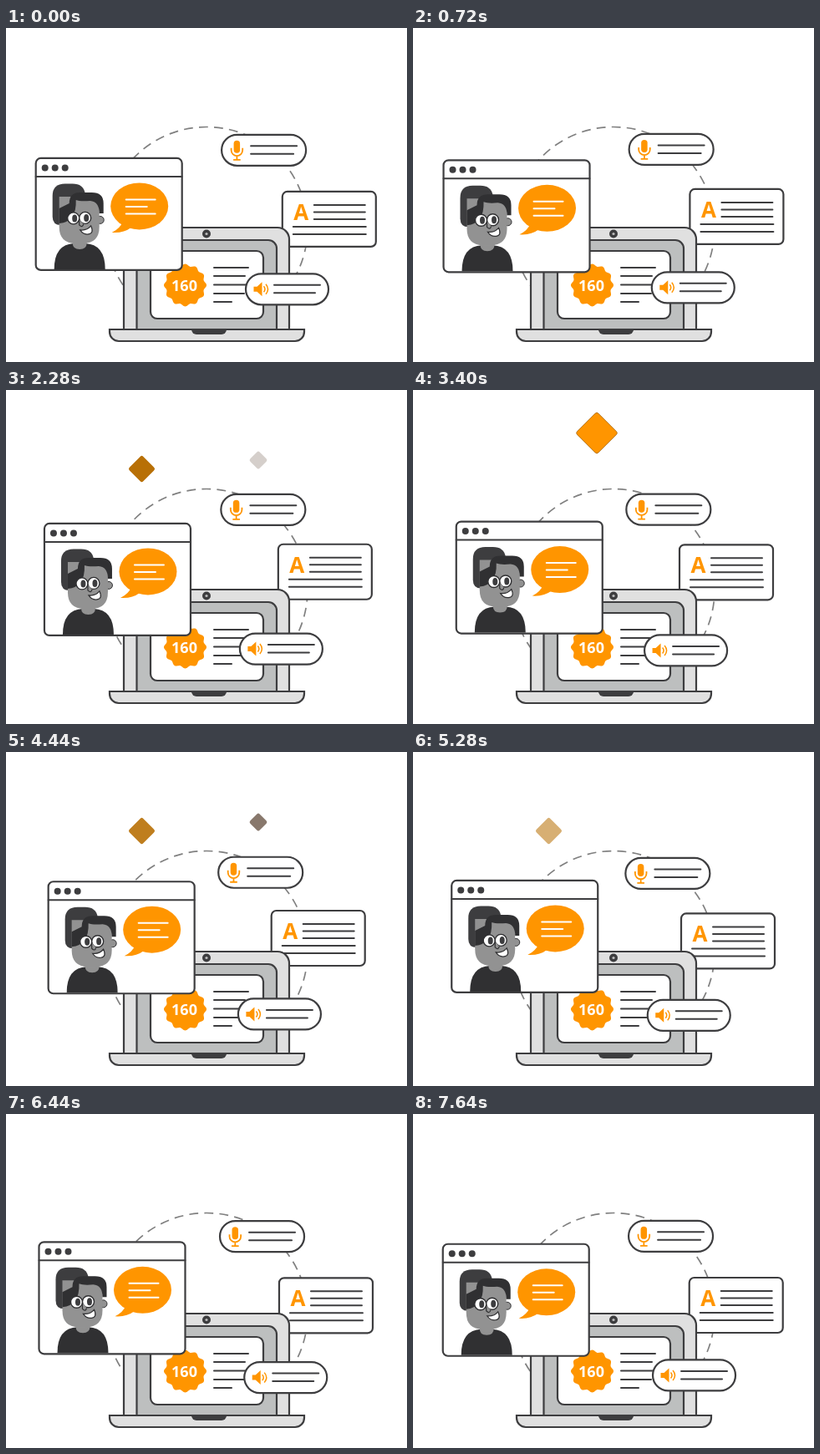
Write an HTML page that moves like this. It is 480 px wide and 400 px high and loops after 7680 ms.

```html
<!DOCTYPE html>
<html lang="en">
<head>
<meta charset="utf-8">
<title>Online lesson</title>
<style>
  html, body { margin: 0; width: 100%; height: 100%; overflow: hidden; background: #fff; }
  svg { display: block; width: 480px; height: 400px; }
  text { font-family: "Open Sans", "Noto Sans", sans-serif; font-weight: 700; }
  .o { stroke: #3d3d3f; stroke-width: 2.2; }
  .l { stroke: #3d3d3f; stroke-width: 2; stroke-linecap: round; fill: none; }
  .w { fill: #fff; }
  .a { fill: #ff9500; }
  .d { fill: #3d3d3f; }
  .s { fill: #929292; }
</style>
</head>
<body>
<svg viewBox="0 0 480 400">
  <circle id="ring" cx="240" cy="239.5" r="121" fill="none" stroke="#808080" stroke-width="1.7"
          pathLength="420" stroke-dasharray="6 4"/>

  <rect id="left" class="gem" fill="#b87006"/>
  <rect id="right" class="gem" fill="#88786c"/>
  <rect id="top" class="gem a" stroke="#a86508" stroke-width=".8"/>

  <g id="mic">
    <rect class="w o" width="101" height="37" rx="18.5"/>
    <rect class="a" x="14.5" y="7" width="7.5" height="15" rx="3.7"/>
    <path d="M11.5 16v2.5a6.8 6.8 0 0 0 13.6 0V16M18.3 25.5V30M14 30h8.6" fill="none" stroke="#ff9500" stroke-width="1.8"/>
    <path class="l" d="M35 13.5h55M35 23h51"/>
  </g>

  <g id="card">
    <rect class="w o" width="112" height="66" rx="6"/>
    <text class="a" x="13.5" y="34" font-size="26">A</text>
    <path class="l" d="M38 16h61M38 24.5h61M38 33h61M13 42h87M13 51h87"/>
  </g>

  <g id="laptop">
    <path class="o" fill="#e0e0e0" d="M141 361V253a14 14 0 0 1 14-14H325a14 14 0 0 1 14 14V361z"/>
    <path class="o" fill="#bdbfbf" d="M156.5 361V264a10 10 0 0 1 10-10H314a10 10 0 0 1 10 10V361z"/>
    <rect class="w o" x="173" y="267" width="135" height="81" rx="8"/>
    <path class="o" fill="#e0e0e0" d="M124 361H357V364a11 11 0 0 1-11 11H135a11 11 0 0 1-11-11z"/>
    <path class="d" d="M222 361H264a6 6 0 0 1-6 6H228a6 6 0 0 1-6-6z"/>
    <circle class="d" cx="240" cy="246.5" r="5"/>
    <circle fill="#bbb" cx="240" cy="246.5" r="1.6"/>
    <path id="badge" class="a"/>
    <text class="w" x="213.5" y="314.5" font-size="18" text-anchor="middle">160</text>
    <path class="l" d="M249 287h41M249 297h37M249 307.5h41M249 318h36M249 328h21"/>
  </g>

  <g id="sound">
    <rect class="w o" width="99" height="37" rx="18.5"/>
    <path class="a" d="M9.5 15.5h4l6-5.5v17l-6-5.5h-4z"/>
    <path d="M21.5 15q3 3.5 0 7M24 12.5q5 6 0 12" fill="none" stroke="#ff9500" stroke-width="1.5"/>
    <path class="l" d="M34 13.5h55M34 23h49"/>
  </g>

  <g id="window">
    <rect class="w o" width="175" height="134" rx="6"/>
    <path class="l" d="M0 22H175"/>
    <g class="d"><circle cx="11" cy="11.5" r="4"/><circle cx="23" cy="11.5" r="4"/><circle cx="35" cy="11.5" r="4"/></g>
    <path class="d" d="M20 45Q20 30.5 35 30.5H44Q57 30.5 59 42L62 80H30Q20 80 20 70z"/>
    <path fill="#303032" d="M22 133Q22 103 46 102H59Q83 103 83 133z"/>
    <path class="s" d="M44 94H61V101Q61 109 52.5 109T44 101z"/>
    <circle class="s" cx="77" cy="74" r="4.5" stroke="#303032"/>
    <path class="s" d="M28 46H76V82Q76 102 56 102H48Q28 102 28 82z"/>
    <path fill="#303032" d="M40 54Q40 41 53 41H67Q81 41 81 54V66H76Q76 52 65 51Q53 52 48 50Q49 76 28 78V60z"/>
    <g class="w" stroke="#303032" stroke-width="1.4"><circle cx="45" cy="72" r="7"/><circle cx="59" cy="71.5" r="7"/></g>
    <ellipse class="d" cx="46.5" cy="72" rx="3" ry="4.5"/>
    <ellipse class="d" cx="60.5" cy="71.5" rx="3" ry="4.5"/>
    <path class="s" d="M52 73v7q4 4 5-1" stroke="#303032" stroke-width="1.2"/>
    <path class="w" d="M53 86q8 1 13-5 4 9-3 10-6 1-10-5z" stroke="#303032" stroke-width="1.2"/>
    <path class="a" d="M104 76Q101 84 91 89Q105 90 114 83z"/>
    <ellipse class="a" cx="124" cy="57.5" rx="34.5" ry="28"/>
    <path d="M108 49.5h35M108 58h25M108 66.5h35" fill="none" stroke="#fff" stroke-width="2" stroke-linecap="round"/>
  </g>
</svg>
<script>
  const LOOP = 7680;
  const $ = id => document.getElementById(id);

  // Per axis: centre, then cos, sin, cos 2, sin 2 amplitudes
  const drift = {
    window: [[43.6, -8.2, 0, .3, -.4], [156.5, -.3, 3.4, -.3, .3]],
    mic: [[256.4, 1.7, 1.5, 0, 0], [126.4, 1.4, -1.2, 0, 0]],
    card: [[325, 6.6, 2.2, -.8, 0], [191, 4.4, -4.4, .5, .6]],
    sound: [[282, 5, -.7, 0, 0], [294.3, 0, -3, 0, -.3]]
  };
  // Place and size, then fade spans: start, full, start of fade-out, end
  const gems = {
    left: [162.5, 94.5, 16, [1150, 2250, 2700, 3200], [3900, 4500, 4800, 5900]],
    right: [302, 84, 11, [2050, 2700, 2850, 3250], [3900, 4300, 4600, 5200]],
    top: [220, 51.5, 24.5, [2500, 3100, 3600, 4000]]
  };

  const wave = ([c, a, b, a2, b2], q) =>
    c + a * Math.cos(q) + b * Math.sin(q) + a2 * Math.cos(2 * q) + b2 * Math.sin(2 * q);
  const clamp = v => Math.max(0, Math.min(1, v));
  const fade = (t, [a, b, c, d]) => clamp((t - a) / (b - a)) * clamp((d - t) / (d - c));

  let outline = '';
  for (let i = 0; i < 180; i++) {
    const a = i * Math.PI / 90, r = 24.2 + 1.3 * Math.cos(12 * a);
    outline += `${i ? 'L' : 'M'}${(214.5 + r * Math.cos(a)).toFixed(2)} ${(308 + r * Math.sin(a)).toFixed(2)}`;
  }
  $('badge').setAttribute('d', outline + 'z');

  for (const id in gems) {
    const [x, y, half] = gems[id], side = half * 1.46;
    const attrs = { x: -side / 2, y: -side / 2, width: side, height: side, rx: 2.5,
      transform: `translate(${x} ${y}) rotate(45)` };
    for (const k in attrs) $(id).setAttribute(k, attrs[k]);
  }

  function draw(now) {
    const t = now % LOOP, q = t / LOOP * 2 * Math.PI;
    for (const id in drift) {
      const [x, y] = drift[id].map(axis => wave(axis, q));
      $(id).setAttribute('transform', `translate(${x} ${y})`);
    }
    for (const id in gems) {
      const spans = gems[id].slice(3);
      $(id).setAttribute('opacity', Math.max(...spans.map(s => fade(t, s))));
    }
    $('ring').setAttribute('stroke-dashoffset', -t / LOOP * 40);
  }

  const start = performance.now();
  function tick() {
    draw(performance.now() - start);
    requestAnimationFrame(tick);
  }
  draw(0);
  requestAnimationFrame(tick);
</script>
</body>
</html>
```
